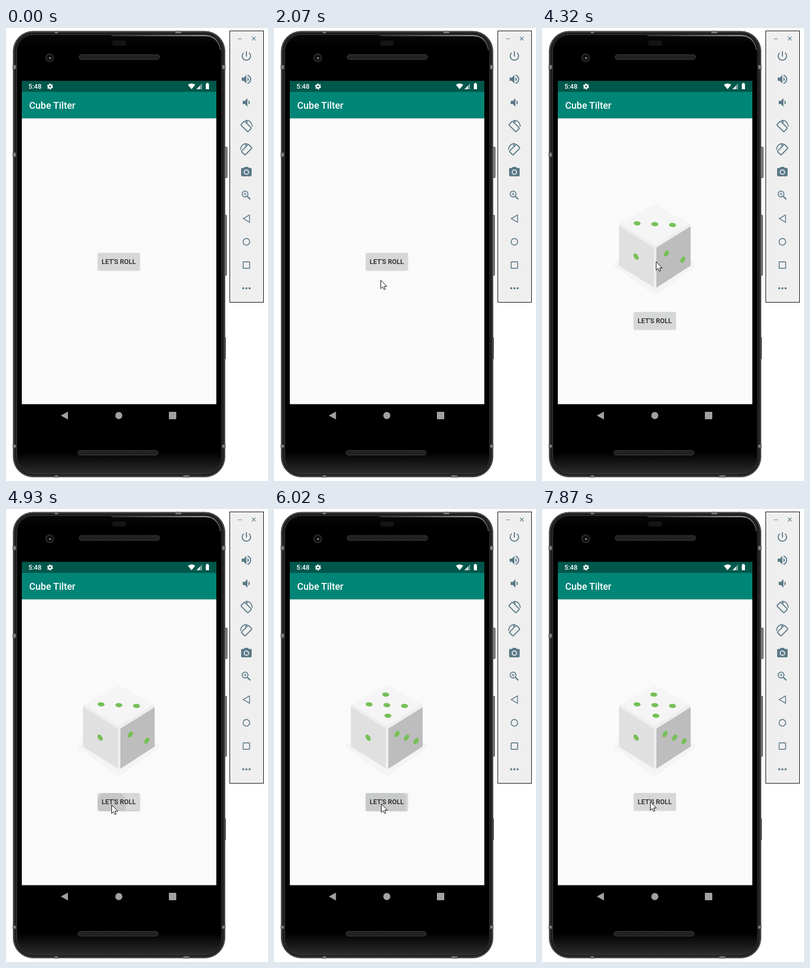
An HTML page for the animation above (8 s loop, 497 by 858 pixels).

```html
<!DOCTYPE html>
<html lang="en">
<head>
<meta charset="utf-8">
<title>Cube Tilter</title>
<style>
html, body { margin: 0; width: 100%; height: 100%; overflow: hidden; background: #fff; }
svg { display: block; }
text { font-family: Roboto, Arial, sans-serif; font-weight: 500; }
.icon { fill: #5c7a89; }
.line { fill: none; stroke: #5c7a89; stroke-width: 1.7; }
.pip { fill: #76c057; }
</style>
</head>
<body>
<svg width="497" height="858" viewBox="0 0 497 858">
  <defs>
    <linearGradient id="glass" x2="0" y2="1">
      <stop offset="0" stop-color="#080808"/>
      <stop offset=".03" stop-color="#000"/>
      <stop offset=".95" stop-color="#000"/>
      <stop offset="1" stop-color="#2c2c2c"/>
    </linearGradient>
    <linearGradient id="shine">
      <stop offset="0" stop-color="#444"/>
      <stop offset=".85" stop-color="#ddd"/>
      <stop offset="1" stop-color="#666"/>
    </linearGradient>
    <linearGradient id="drop" x2="0" y2="1">
      <stop offset="0" stop-opacity=".12"/>
      <stop offset="1" stop-opacity="0"/>
    </linearGradient>
    <pattern id="mesh" width="3" height="3" patternUnits="userSpaceOnUse">
      <rect width="3" height="3" fill="#141414"/>
      <path d="M0 0L3 3M3 0L0 3" stroke="#333" stroke-width=".7"/>
    </pattern>
    <filter id="blur" x="-20%" y="-40%" width="140%" height="180%"><feGaussianBlur stdDeviation="1"/></filter>
    <clipPath id="face"><rect x="174" y="426" width="80" height="33" rx="2"/></clipPath>
  </defs>

  <!-- phone -->
  <g fill="#858585" stroke="#3a3a3a">
    <rect x="413" y="225.500" width="6.500" height="58" rx="1"/>
    <rect x="413" y="354.500" width="5.500" height="114" rx="1"/>
    <rect x="413" y="586.500" width="3.500" height="40"/>
  </g>
  <rect x="13.500" y="6" width="402" height="844.500" rx="38" fill="#1e1e1e" stroke="#555"/>
  <rect x="15" y="7.500" width="399" height="841.500" rx="36.500" fill="none" stroke="#5e5e5e"/>
  <g fill="#808080" stroke="#333" stroke-width=".8">
    <path d="M13 70h6v8h-6zM13 236h6v8h-6zM13 789h6v6h-6zM410 70h6v8h-6zM410 789h6v6h-6z"/>
    <path d="M92 6h7v4h-7zM321 6h12v4h-12zM92 847h7v4h-7zM336 847h12v4h-12z"/>
  </g>
  <rect x="20.500" y="12.500" width="388.500" height="832" rx="31" fill="url(#glass)" stroke="#3a3a3a"/>
  <path d="M200 14.500H378Q402 15 407 42" fill="none" stroke="url(#shine)" stroke-width="1.500"/>

  <rect x="201" y="23.500" width="27" height="10" rx="5" fill="#141414"/>
  <circle cx="83" cy="56.500" r="8.500" fill="#252525"/>
  <circle cx="83" cy="56.500" r="5.500" fill="#0b0d0e"/>
  <circle cx="83.500" cy="57" r="2" fill="#7c8583"/>
  <g fill="url(#mesh)" stroke="#3f3f3f">
    <rect x="138.500" y="50.500" width="153" height="9" rx="4.500"/>
    <rect x="136.500" y="800" width="152" height="9" rx="4.500"/>
  </g>

  <!-- screen -->
  <path d="M30 100h369v612.500H30z" fill="#fafafa"/>
  <path d="M30 171h369v3H30z" fill="url(#drop)"/>
  <path d="M30 121h369v50H30z" fill="#008577"/>
  <path d="M30 100h369v21H30z" fill="#00574b"/>
  <text x="42.500" y="115" font-size="12.600" fill="#fff">5:48</text>
  <g fill="none" stroke="#fff">
    <circle cx="83.500" cy="110.800" r="3" stroke-width="2.400"/>
    <circle cx="83.500" cy="110.800" r="4.800" stroke-width="1.800" stroke-dasharray="2.800 2.227"/>
  </g>
  <path d="M345 107.500Q352 102.500 359 107.500L352 116z" fill="#fff"/>
  <path d="M361 116L372 105V116z" fill="#6f9f96"/>
  <path d="M361 116L368 109V116z" fill="#fff" opacity=".75"/>
  <path d="M379 105.500h1.500V104h3v1.500H385V116h-6z" fill="#fff"/>
  <text x="44" y="153" font-size="18" fill="#fff">Cube Tilter</text>
  <g fill="#a1a1a1">
    <path d="M104 734L117.500 726.500V741.500z"/>
    <circle cx="214" cy="734" r="6.700"/>
    <rect x="309" y="727" width="14" height="14" rx="1"/>
  </g>

  <g id="die" visibility="hidden">
    <path d="M139 445L214 396L289 445Q293 449 289 453L219 503Q214 507 209 503L139 453Q135 449 139 445z" fill="#f4f4f4"/>
    <path d="M148 370L210 336.500Q214 334 218 336.500L280 370Q282 371.500 282 374V450L217 492Q214 494 211 491L146 450V374Q146 371.500 148 370z" fill="#eee"/>
    <path d="M148 370L210 336.500Q214 334 218 336.500L280 370L214 411z" fill="#f5f5f5"/>
    <path d="M146 374.500L212 416V491L146 450z" fill="#e0e0e0"/>
    <path d="M217 416L282 375.500V450L217 492z" fill="#bdbdbd"/>
    <g id="pips"></g>
  </g>

  <g id="button">
    <rect id="shadow" x="174.500" y="427" width="79" height="32.500" rx="2" filter="url(#blur)"/>
    <rect x="174" y="426" width="80" height="33" rx="2" fill="#d6d7d7"/>
    <g clip-path="url(#face)"><circle id="ripple"/></g>
    <text x="181.500" y="447" font-size="12.600" fill="#212121">LET'S ROLL</text>
  </g>

  <!-- side toolbar -->
  <rect x="424.500" y="5.500" width="64" height="514" fill="#efefef" stroke="#000"/>
  <path class="line" d="M440 20.500h7M466.500 16.500l7 7m0-7l-7 7" style="stroke-width:1.200"/>
  <path class="icon" transform="translate(444 41)" d="M13 3h-2v10h2zM17.800 5.200l-1.400 1.400a7 7 0 1 1-8.800 0L6.200 5.200a9 9 0 1 0 11.600 0z"/>
  <path class="icon" transform="translate(444 85)" d="M3 9v6h4l5 5V4L7 9zM16.500 12c0-1.770-1-3.300-2.500-4v8c1.500-.7 2.500-2.200 2.500-4zM14 3.200v2.100a7 7 0 0 1 0 13.400v2.100a9 9 0 0 0 0-17.600z"/>
  <path class="icon" transform="translate(444 129)" d="M5 9v6h4l5 5V4L9 9zM18.500 12c0-1.770-1-3.300-2.500-4v8c1.500-.7 2.500-2.200 2.500-4z"/>
  <g id="turn" class="line">
    <rect x="-9.500" y="-5" width="19" height="10" rx="1.500" transform="translate(455.500 186.500) rotate(45)" style="stroke-width:2"/>
    <path d="M454.500 174.800Q466 174.500 467.200 187M454.500 174.800l4 4"/>
  </g>
  <use href="#turn" transform="translate(912 44) scale(-1 1)"/>
  <path class="icon" d="M453 263l-1.800 2H448q-2 0-2 2v12q0 2 2 2h16q2 0 2-2v-12q0-2-2-2h-3.200l-1.800-2z"/>
  <circle cx="456" cy="273" r="4.100" fill="#5c7a89" stroke="#efefef" stroke-width="1.800"/>
  <circle class="line" cx="453.500" cy="314.500" r="5.600"/>
  <path class="line" d="M457.800 318.800l5.700 5.700" style="stroke-width:2.400"/>
  <path class="line" d="M450.500 314.500h6m-3-3v6" style="stroke-width:1.100"/>
  <path class="line" d="M450 361L462 354V368z" style="stroke-width:1.500"/>
  <circle class="line" cx="456" cy="405" r="6.300"/>
  <rect class="line" x="449.800" y="442.800" width="12.400" height="12.400" rx="1"/>
  <path class="line" d="M450 493h.01m6 0h.01m6 0h.01" stroke-linecap="round" style="stroke-width:4"/>

  <path id="cursor" visibility="hidden" d="M.5 .7V16.800L4.200 13.300L6.700 18.600L9.200 17.500L6.800 12.300H12z" fill="#fff" stroke="#000" stroke-linejoin="round"/>
</svg>
<script>
const LOOP = 8000, STEP = 77.5, SHIFT = 112;
const $ = id => document.getElementById(id);
const set = (el, attrs) => { for (const k in attrs) el.setAttribute(k, attrs[k]); };
const latest = (list, t) => list.findLast(item => item.at <= t);

// the screen is refreshed in steps, counted from each action
const stepped = age => Math.floor(age / STEP) * STEP;

const easeOut = p => 1 - (1 - p) ** 2;
const easeInOut = p => p * p * (3 - 2 * p);

const glides = [
  { at: 440, time: 700, from: [171, 765], to: [197, 482], ease: easeOut },
  { at: 2070, time: 540, from: [202, 477], to: [216, 432], ease: easeOut },
  { at: 4320, time: 310, from: [216, 442], to: [200, 560], ease: easeInOut, bend: 10 },
  { at: 5390, time: 80, from: [202, 559], to: [203, 558], ease: easeOut },
  { at: 7640, time: 230, from: [205, 555], to: [205, 554], ease: easeOut }
];
const presses = [
  { at: 3370, time: 330 }, { at: 4780, time: 460 },
  { at: 5850, time: 320 }, { at: 6790, time: 390 }
];
const rolls = [
  { at: 3530, top: 3, left: 1, right: 2 },
  { at: 4940, top: 4, left: 2, right: 1 },
  { at: 5930, top: 5, left: 1, right: 3 }
];

// each side has a centre and the directions in which pairs of pips spread
const sides = {
  top: { mid: [214, 371.5], axes: [[33.6, 1.5], [2, 20]], tilt: 95 },
  left: { mid: [178.5, 433], axes: [[18, -6.7]], tilt: -35 },
  right: { mid: [251.5, 433], axes: [[18, 6.7]], tilt: 35 }
};

function pips(name, n) {
  const { mid: [x, y], axes, tilt } = sides[name];
  const odd = n % 2, spread = odd ? 1 : .87;
  const spots = odd ? [[x, y]] : [];
  for (const [dx, dy] of axes.slice(0, n >> 1))
    for (const s of [-spread, spread]) spots.push([x + s * dx, y + s * dy]);
  return spots.map(([px, py]) =>
    `<ellipse class="pip" rx="4" ry="6.600" transform="translate(${px} ${py}) rotate(${tilt})"/>`).join('');
}

let shown;
function showDie(roll) {
  if (roll === shown) return;
  shown = roll;
  set($('die'), { visibility: roll ? 'visible' : 'hidden' });
  set($('button'), { transform: `translate(0 ${roll ? SHIFT : 0})` });
  $('pips').innerHTML = roll ? Object.keys(sides).map(s => pips(s, roll[s])).join('') : '';
}

function tipAt(t) {
  const g = latest(glides, t);
  if (!g) return null;
  const p = Math.min(1, stepped(t - g.at) / g.time);
  const [x, y] = g.from.map((v, i) => v + (g.to[i] - v) * g.ease(p));
  return [x + (g.bend || 0) * Math.sin(Math.PI * p), y].map(Math.round);
}

function draw(t) {
  const roll = latest(rolls, t);
  showDie(roll);

  const tip = tipAt(t);
  set($('cursor'), { visibility: tip ? 'visible' : 'hidden' });
  if (tip) set($('cursor'), { transform: `translate(${tip})` });

  const press = latest(presses, t);
  const age = press ? stepped(t - press.at) : 0;
  const active = press && t < press.at + press.time;
  set($('shadow'), { y: active ? 427.5 : 426.7, opacity: active ? .3 : .22 });
  set($('ripple'), active ? {
    cx: tip[0],
    cy: tip[1] - (roll ? SHIFT : 0),
    r: 8 + .26 * age,
    opacity: .085 * (1 - (age / press.time) ** 2)
  } : { r: 0 });
}

const start = performance.now();
function tick() {
  draw((performance.now() - start) % LOOP);
  requestAnimationFrame(tick);
}
tick();
</script>
</body>
</html>
```
